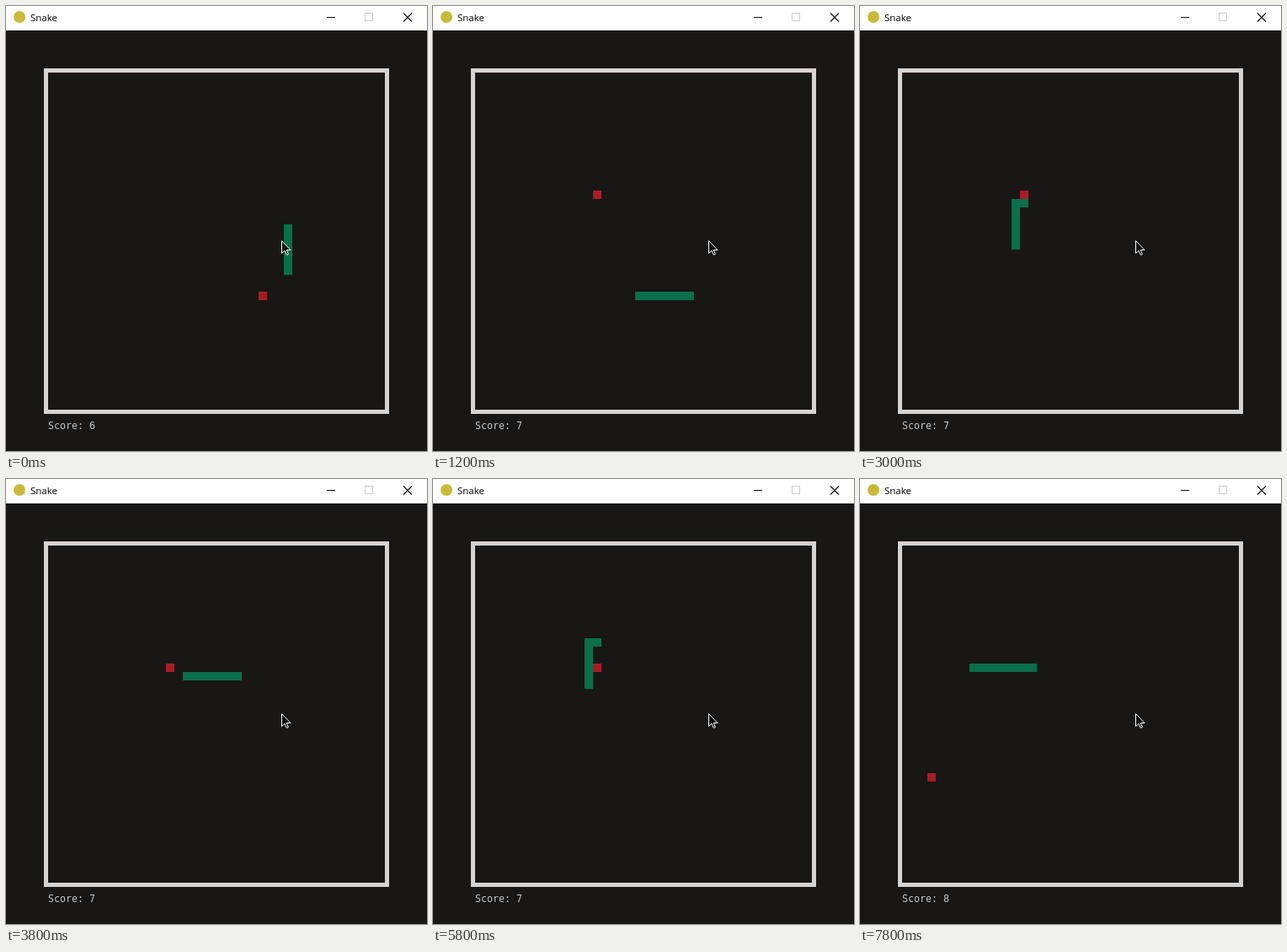
An HTML page for the animation above (8 s loop, 500 by 528 pixels).

```html
<!DOCTYPE html>
<html lang="en">
<head>
<meta charset="utf-8">
<title>Snake</title>
<style>
  html, body { margin: 0; width: 100%; height: 100%; overflow: hidden; background: #181715; }
  svg { display: block; width: 500px; height: 528px; }
</style>
</head>
<body>
<svg viewBox="0 0 500 528" xmlns="http://www.w3.org/2000/svg">
  <rect width="500" height="528" fill="#181715"/>
  <rect width="500" height="29" fill="#fff"/>
  <circle cx="16" cy="13" r="7" fill="#c9b93a"/>
  <text x="29" y="18" font-family="'Open Sans', 'Noto Sans', sans-serif" font-size="11.5" fill="#000">Snake</text>
  <g fill="none" stroke="#111">
    <path d="M381 13.5H391"/>
    <rect x="426.5" y="8.5" width="9" height="9" stroke="#ccc"/>
    <path d="M472 8.5L482 18.5M482 8.5L472 18.5" stroke-width="1.1"/>
  </g>
  <rect x="47.5" y="76.5" width="405" height="405" fill="none" stroke="#d8d3d2" stroke-width="5"/>
  <rect id="food" width="10" height="10" fill="#a81c25"/>
  <path id="snake" fill="#0b6e4c" shape-rendering="crispEdges"/>
  <text id="score" x="50" y="502" font-family="'DejaVu Sans Mono', 'Noto Sans Mono', monospace" font-size="11.65" fill="#c9c5c3"></text>
  <path d="M327.5 278.5V293.5L331 290.3L333.3 295.3L335.4 294.4L333.2 289.5H338Z" fill="#0c0c0c" stroke="#fff" stroke-linejoin="round"/>
</svg>
<script>
const LOOP = 8000, SHOT = 200, START_LENGTH = 6;
const DIRS = { U: [0, -1], D: [0, 1], L: [-1, 0], R: [1, 0] };
const ROUTE = 'D8 L15 U11 R10 U4 L10 D5 R6 U2 L11';
const MEALS = [6, 71];  // ticks at which the head reaches the food
const FOODS = [[300, 339], [190, 219], [80, 349]];
const el = id => document.getElementById(id);
const food = el('food'), snake = el('snake'), score = el('score');

const trail = [[330, 259]];
for (const leg of ROUTE.split(' ')) {
  const [dx, dy] = DIRS[leg[0]];
  for (let i = +leg.slice(1); i > 0; i--) {
    const [x, y] = trail[trail.length - 1];
    trail.push([x + dx * 10, y + dy * 10]);
  }
}

function draw(time) {
  const shot = Math.floor((time % LOOP) / SHOT);
  // two moves per shot; the game drops one tick late in the loop
  const tick = shot * 2 - (shot >= 34 ? 1 : 0);
  const eaten = MEALS.filter(m => tick > m).length;
  const length = START_LENGTH + eaten;
  const end = tick + START_LENGTH;
  const body = trail.slice(end - length, end);
  snake.setAttribute('d', body.map(([x, y]) => `M${x} ${y}h10v10h-10z`).join(''));
  food.setAttribute('x', FOODS[eaten][0]);
  food.setAttribute('y', FOODS[eaten][1]);
  score.textContent = `Score: ${length}`;
}

const began = performance.now();
function loop() {
  draw(performance.now() - began);
  requestAnimationFrame(loop);
}
loop();
</script>
</body>
</html>
```
